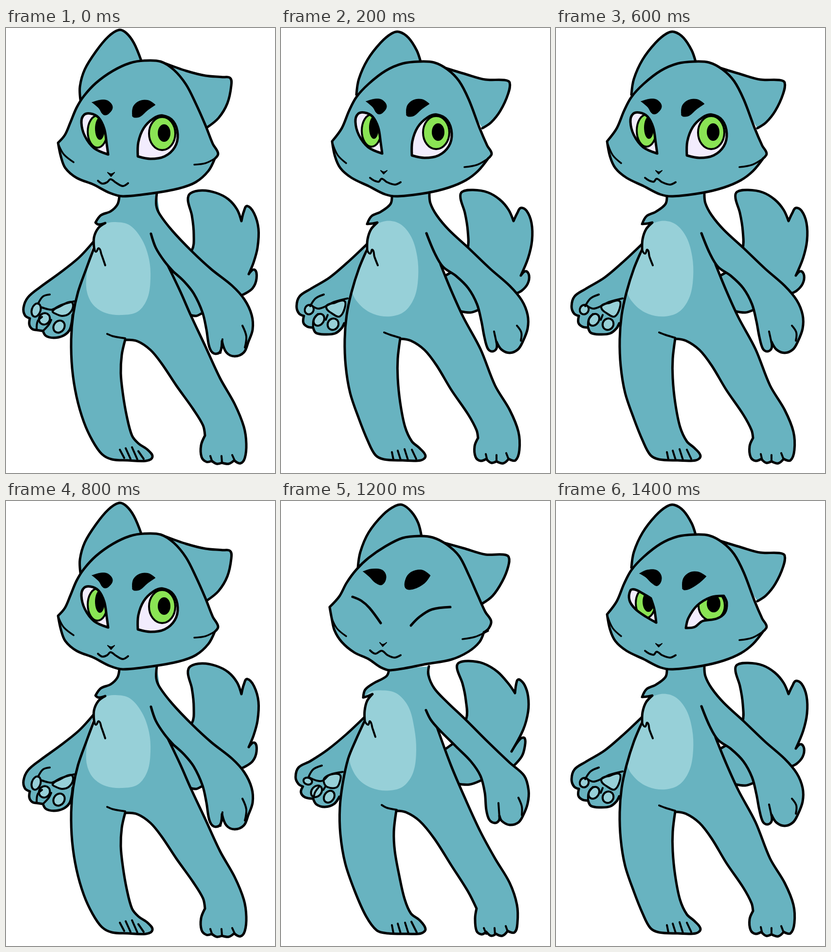
These frames come from a looping animation (553 px wide and 915 px high, 1.6 s). An HTML page with a canvas:

```html
<!DOCTYPE html>
<html lang="en">
<head>
<meta charset="utf-8">
<title>Teal cat</title>
<style>
html, body { margin: 0; height: 100%; overflow: hidden; background: #fff; }
canvas { display: block; width: 100vw; height: 100vh; }
</style>
</head>
<body>
<canvas id="stage" width="553" height="915"></canvas>
<script>
const ctx = document.getElementById('stage').getContext('2d');
const FUR = '#68b3c0', PALE = '#97d0d8', GREEN = '#8ae454', WHITE = '#f2ecfd';

// Outlines are points joined by a smooth curve; "!" marks a sharp corner.
const swayRight = {
  tail: '382,457 386,425 382,385 374,354 379,340 403,334 432,339 457,352 475,373 484,397! 489,377 496,366 510,381 519,413 517,452 509,482 499,506! 511,497 515,515 507,535 490,547 478,551! 400,588! 391,592 378,590! 340,504!',
  backArm: '181,438 150,472 110,504 70,533 45,554 36,575 39,591 49,597! 48,610 54,619 63,621! 76,623! 82,633 98,637 117,633 130,622 135,606 137,590',
  hand: ['90,548 76,552 66,567', '140,562 112,570 95,579 85,578 72,574', '63,619 65,603 74,594', '77,622 88,610 93,600'],
  pads: [[62, 580, 9, 14, .3], [79, 598, 11, 12, .5], [109, 614, 11, 13, .6]],
  bigPad: '96,582 112,572 133,563 138,572 130,587 116,592 103,588',
  body: '233,346 229,363 215,377 195,385 184,400! 190,404 204,401! 190,411 181,430 181,452! 165,495 148,543 138,590 134,640 136,700 145,758 160,810 178,849 197,876 218,887 250,889 288,890 301,882 292,868 272,854 259,838 248,797 240,750 236,710 238,672 245,641! 270,644 297,662 320,690 350,735 385,784 405,817 409,838! 401,858 402,882 412,892 423,890! 433,896 444,894! 458,896 469,889! 482,895 491,884 494,855 489,820 470,773 440,720 410,655 380,591 358,541 332,487',
  belly: '225,399 255,406 280,436 294,475 297,515 291,555 271,583 239,590 205,586 180,570 167,545 165,515 171,479 180,449 184,421 200,404',
  arm: '310,340 309,365 316,383 342,417 382,459 422,496 465,530 490,558 505,590 507,620 498,646 489,667 470,675 453,667 444,644! 440,666 427,669 418,656 412,620 404,585 386,546 366,521 345,502! 326,480 308,452 298,423',
  marks: ['208,629 221,634 245,638', '182,454 185,460 191,453 196,465 204,488', '234,867 243,884', '246,864 256,886', '259,862 270,887', '272,870 283,886', '420,880 424,892', '443,880 444,893', '465,878 470,889', '445,640 441,668', '486,612 494,634 491,657'],
  earL: '153,148 152,120 162,85 185,48 210,18 232,4 247,10 263,31 278,67',
  earR: '328,73 370,88 410,98 445,101 461,103 463,119 455,155 437,185 414,204',
  head: '285,67 318,69 345,86 370,116 390,155 410,200 425,238 436,258 429,269! 416,294 390,317 355,330 300,340 240,346 213,339 180,322 145,308 122,288 113,265 107,236! 121,220 132,195 145,164 160,140 185,113 220,88 255,72',
  cheeks: ['109,242 119,260 139,276', '387,281 410,278 430,268'],
  nose: '209,297! 216,300 223,297! 216,305!',
  mouth: '189,314 198,320 208,317 215,311 226,318 240,325 251,319'
};
const middle = {
  tail: '383,455 384,418 378,380 369,350 372,337 395,333 425,338 450,353 468,374 478,397! 486,380 493,370 505,376 515,401 516,437 508,473 493,509! 503,500 510,509 507,526 495,540 481,547! 405,580! 389,585 366,582! 333,512! 354,500!',
  backArm: '176,445 140,479 100,513 60,537 38,552 32,572 37,587 47,592! 46,606 54,614 66,616! 72,627 90,630 111,628 124,618 130,607',
  hand: ['88,548 71,556 60,572', '137,556 110,563 90,573 76,577 62,570', '66,614 67,600 76,588', '92,600 96,590'],
  pads: [[58, 579, 9, 10, .5], [78, 600, 10, 13, .6], [107, 609, 11, 12, .5]],
  bigPad: '93,573 111,565 130,561 131,576 121,593 108,589',
  body: '228,345 225,362 205,378 186,387 177,403! 188,402 198,400! 185,414 178,434 177,455! 160,495 145,543 135,590 131,640 133,695 142,750 160,803 178,848 194,878 212,887 250,889 287,889 297,880 285,864 269,850 255,820 245,770 240,720 240,680 245,639! 267,643 295,662 320,694 350,744 385,795 402,827 405,843! 398,860 400,882 410,890 422,886! 432,894 443,891! 457,895 468,886! 482,889 490,868 488,830 470,785 440,735 410,660 375,595 350,540 328,486',
  belly: '215,397 245,403 268,430 280,470 282,512 275,552 255,582 225,593 190,588 162,569 146,540 157,495 176,450 188,411',
  arm: '305,340 307,360 320,385 345,415 385,452 430,495 470,530 495,560 507,590 507,618 497,645 487,661 470,668 453,661 443,645! 443,659 434,665 425,659 418,635 412,603 403,568 385,535 360,510 333,491 316,463 299,422',
  marks: ['212,626 225,631 245,637', '177,455 183,464 188,456 192,470 199,488', '228,872 231,887', '240,869 246,888', '254,866 261,888', '269,867 278,886', '421,876 424,889', '443,878 443,892', '463,874 468,887', '438,624 443,647', '485,612 494,626 493,643'],
  earL: '155,137 160,105 178,65 205,30 228,11 243,8 262,20 279,46 287,69',
  earR: '334,81 380,95 420,106 459,107 470,112 467,135 451,170 432,194 414,206',
  head: '285,69 315,71 342,85 366,109 386,147 408,205 424,242 433,258 426,268! 405,294 380,313 345,328 300,339 240,346 214,342 180,325 145,308 122,288 111,264 105,233! 125,206 140,170 155,142 180,115 215,88 250,73',
  cheeks: ['107,240 117,262 134,278', '377,286 404,281 429,266'],
  nose: '205,293! 211,296 218,293! 211,300!',
  mouth: '183,308 192,314 201,316 207,310 218,317 234,322 246,317'
};
const swayLeft = {
  tail: '381,447 380,410 373,375 362,345 365,333 386,329 416,334 445,351 468,376 481,395! 485,370 490,367 501,379 508,402 508,433 498,470 474,515! 492,489 501,488 501,506 495,525 479,544! 410,575! 387,583 360,581! 331,515! 352,500!',
  backArm: '172,444 135,479 95,512 60,535 36,548 30,568 36,582 45,587! 41,599 49,609 66,612! 73,624 90,629 109,623 120,608',
  hand: ['84,544 66,552 56,569', '127,557 100,563 86,575 74,575 57,568', '67,611 70,599 78,588', '87,594 92,586'],
  pads: [[55, 576, 9, 7, .3], [73, 597, 10, 13, .7], [99, 608, 10, 13, .6]],
  bigPad: '90,569 104,562 121,563 121,577 114,589 95,588 88,578',
  body: '222,346 217,360 190,375 173,388 169,404! 179,401 188,397! 177,411 172,431 172,452! 154,491 138,530 127,580 121,630 122,685 132,745 152,803 175,854 197,883 220,889 260,890 288,889 297,880 285,862 267,848 254,818 243,770 234,720 232,680 237,637! 257,640 285,658 315,694 350,749 385,804 402,838! 399,858 402,884 412,891 422,886! 432,894 442,890! 455,894 466,884! 480,887 486,868 485,830 470,785 440,735 410,680 380,615 350,545 321,466',
  belly: '212,392 245,398 270,426 282,470 286,515 280,560 260,589 230,598 195,593 165,572 148,534 150,500 169,455 178,410 190,396',
  arm: '304,340 303,358 315,385 340,412 380,450 425,495 470,538 500,565 509,595 507,622 498,646 488,661 470,666 454,658 449,647! 448,657 439,662 428,655 422,635 419,600 410,565 390,535 360,505 325,470 308,450 298,430',
  marks: ['207,625 218,631 238,635', '172,452 179,460 183,453 188,467 194,485', '228,872 231,888', '240,869 246,889', '255,867 262,889', '268,865 279,887', '417,878 422,890', '439,878 440,891', '462,874 466,885', '447,621 449,650', '488,610 495,628 495,646'],
  earL: '158,137 163,105 180,65 210,28 235,10 250,8 268,22 282,45 289,73',
  earR: '328,84 375,97 420,110 455,110 468,115 467,135 455,165 435,195 412,212',
  head: '285,72 312,75 340,89 366,113 385,150 405,195 420,228 432,247 427,262 417,270! 408,290 385,310 350,326 300,335 225,348 205,342 180,325 150,311 125,290 110,266 104,240 100,218! 120,196 135,168 155,141 180,117 215,93 250,76',
  cheeks: ['104,240 115,262 134,278', '373,284 400,279 426,267'],
  nose: '203,291! 209,295 217,291! 209,299!',
  mouth: '183,307 194,314 207,308 219,317 233,322 246,317'
};

// Each eye: outline, iris ellipse, pupil ellipse.
const wide = {
  brows: ['177,153! 195,148 210,150 219,163 210,177 200,178 191,165', '260,181 262,161 275,150 293,149 307,158! 291,169 276,182 264,184'],
  eyes: [
    ['210,260! 181,247 162,222 155,195 160,179 174,176 190,184 202,207 207,238', [188, 213, 20, 33], [193, 207, 10, 23]],
    ['271,264! 272,235 283,206 303,186 322,180 344,192 353,219 347,245 326,264 297,269', [321, 217, 27, 34], [325, 216, 13, 18]]
  ]
};
const bright = {
  brows: ['175,144! 195,139 215,146 220,160 212,174 201,173 190,158', '261,184 259,164 270,150 290,145 312,158! 296,172 276,183'],
  eyes: [
    ['205,254! 180,243 158,222 152,195 156,173 169,166 185,175 198,196 203,225', [186, 207, 20, 32], [191, 205, 12, 22]],
    ['264,263! 267,238 280,210 300,188 320,182 343,193 351,217 345,244 325,262 295,267', [320, 217, 27, 32], [323, 217, 14, 20]]
  ]
};
const drowsy = {
  brows: ['172,149! 187,142 208,143 217,158 209,174 196,168 185,157', '260,180 262,159 275,147 293,146 309,155! 295,168 276,180 264,183'],
  eyes: [
    ['206,250! 185,238 163,222 151,204 153,184 162,182 180,191 195,200! 202,222', [184, 210, 20, 31], [190, 207, 12, 21]],
    ['267,261! 272,241 290,215 318,198 345,195! 351,209 347,230 330,242 301,247 285,259', [320, 215, 27, 31], [324, 211, 14, 18]]
  ]
};
const shut = {
  brows: ['169,145! 185,140 208,142 216,156 208,172 194,168 182,156', '256,179 257,159 268,146 290,142 307,153! 295,169 272,181'],
  lids: ['147,197 165,205 182,220 205,251', '267,256 285,238 310,223 348,218']
};
const shift = (x, y, face) => ({ ...face, x, y });
const nudged = shift(-2, -2, wide);
const steps = [
  [swayRight, wide], [middle, nudged], [swayLeft, bright], [middle, nudged],
  [swayRight, wide], [middle, drowsy], [swayLeft, shut, -8], [middle, drowsy]
];

function curve(text, closed) {
  const pts = text.split(' ').map(s => ({ p: s.replace('!', '').split(',').map(Number), sharp: s.endsWith('!') }));
  const n = pts.length, path = new Path2D();
  const at = i => pts[(i + n) % n];
  const handle = (i, sign, len) => {
    const { p, sharp } = at(i);
    if (sharp || (!closed && (i === 0 || i === n - 1))) return p;
    const a = at(i - 1).p, b = at(i + 1).p;
    const k = sign * len / 3 / (Math.hypot(b[0] - a[0], b[1] - a[1]) || 1);
    return [p[0] + (b[0] - a[0]) * k, p[1] + (b[1] - a[1]) * k];
  };
  path.moveTo(...pts[0].p);
  for (let i = 0; i < (closed ? n : n - 1); i++) {
    const a = at(i).p, b = at(i + 1).p, len = Math.hypot(b[0] - a[0], b[1] - a[1]);
    path.bezierCurveTo(...handle(i, 1, len), ...handle(i + 1, -1, len), ...b);
  }
  if (closed) path.closePath();
  return path;
}

function paint(path, fill, width) {
  if (fill) { ctx.fillStyle = fill; ctx.fill(path); }
  if (width) { ctx.lineWidth = width; ctx.stroke(path); }
}

function oval([x, y, rx, ry, turn = 0]) {
  const path = new Path2D();
  path.ellipse(x, y, rx, ry, turn, 0, Math.PI * 2);
  return path;
}

const lines = (list, width) => list.forEach(s => paint(curve(s), null, width));

function within(path, draw) {
  ctx.save();
  ctx.clip(path);
  draw();
  ctx.restore();
}

function drawBody(pose, bellyX) {
  paint(curve(pose.tail, true), FUR, 5);
  paint(curve(pose.backArm), FUR, 5);
  pose.pads.forEach(pad => paint(oval(pad), PALE, 4));
  paint(curve(pose.bigPad, true), PALE, 4);
  lines(pose.hand, 4);

  const outline = curve(pose.body), torso = new Path2D(outline);
  torso.lineTo(...pose.arm.split(' ')[0].split(',').map(Number));
  paint(torso, FUR);
  within(torso, () => {
    ctx.translate(bellyX, bellyX / 3);
    paint(curve(pose.belly, true), PALE);
  });
  paint(outline, null, 5);
  paint(curve(pose.arm), FUR, 5);
  lines(pose.marks, 4);
}

function drawHead(pose, face) {
  paint(curve(pose.earL), FUR, 5);
  paint(curve(pose.earR), FUR, 5);
  paint(curve(pose.head, true), FUR, 5);
  lines(pose.cheeks, 3.5);
  paint(curve(pose.nose, true), '#000', 2);
  lines([pose.mouth], 4);

  ctx.save();
  ctx.translate(face.x || 0, face.y || 0);
  face.brows.forEach(s => paint(curve(s, true), '#000', 1));
  (face.eyes || []).forEach(([shape, iris, pupil]) => {
    const eye = curve(shape, true);
    paint(eye, WHITE);
    within(eye, () => {
      paint(oval(iris), GREEN, 4);
      paint(oval(pupil), '#000');
    });
    paint(eye, null, 5);
  });
  lines(face.lids || [], 5);
  ctx.restore();
}

ctx.lineCap = ctx.lineJoin = 'round';
let shown = -1;
function tick() {
  const step = Math.floor(performance.now() % 1600 / 200);
  if (step !== shown) {
    shown = step;
    const [pose, face, bellyX = 0] = steps[step];
    ctx.fillStyle = '#fff';
    ctx.fillRect(0, 0, 553, 915);
    drawBody(pose, bellyX);
    drawHead(pose, face);
  }
  requestAnimationFrame(tick);
}
tick();
</script>
</body>
</html>
```
